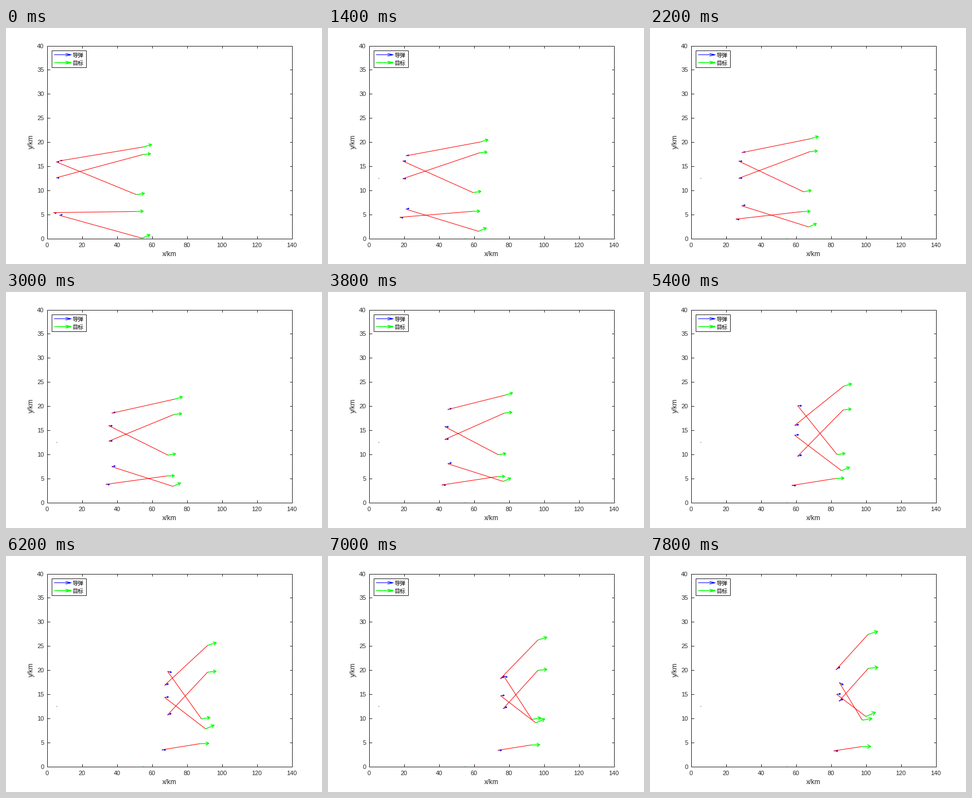
These frames come from a looping animation (560 by 420 pixels, 8 s). A matplotlib script:

```python
import numpy as np
import matplotlib.pyplot as plt
from matplotlib.animation import FuncAnimation
from matplotlib.patches import Rectangle

W, H, DPI = 560, 420, 100
PT = 72 / DPI                       # points per pixel
FRAMES, STEP = 40, 200
LEFT, RIGHT, TOP, BOTTOM = 73, 507, 31, 374
KX, KY = (RIGHT - LEFT) / 140, (BOTTOM - TOP) / 40   # pixels per km
SWITCH = 20                         # frame of the new target allocation
INK = "#262626"
BLUE, GREEN, RED = "#0000ff", "#00ff00", "#ff0000"

fig = plt.figure(figsize=(W / DPI, H / DPI), dpi=DPI, facecolor="white")
ax = fig.add_axes([0, 0, 1, 1])
# pixel centres, nudged so that snapped lines land on the right pixel
ax.set_xlim(-0.4, W - 0.4)
ax.set_ylim(H - 0.6, -0.6)
ax.axis("off")


def px(x):
    return LEFT + x * KX


def py(y):
    return BOTTOM - y * KY


def line(xs, ys, color=INK, width=1.0, **kw):
    kw.setdefault("solid_capstyle", "butt")
    return ax.plot(xs, ys, color=color, lw=width * PT, **kw)[0]


def box(x, y, w, h, face="none", edge=INK, **kw):
    return ax.add_patch(Rectangle((x, y), w, h, fc=face, ec=edge, lw=PT, **kw))


def label(x, y, s, size=11, font="Liberation Sans", **kw):
    kw = {"color": INK, "va": "baseline", **kw}
    ax.text(x, y, s, fontsize=size * PT, fontfamily=font, **kw)


def arrow_points(x, y, dx, dy, back=0.33, half=0.2):
    """Shaft followed by an open V head, sized as parts of the length."""
    tx, ty = x + dx, y + dy
    bx, by = tx - back * dx, ty - back * dy
    xs = [x, tx, np.nan, bx - half * dy, tx, bx + half * dy]
    ys = [y, ty, np.nan, by + half * dx, ty, by - half * dx]
    return xs, ys


def draw_axes(tick=4.3):
    box(LEFT, TOP, RIGHT - LEFT, BOTTOM - TOP)
    for v in range(0, 141, 20):
        for edge, d in ((BOTTOM, -tick), (TOP, tick)):
            line([px(v)] * 2, [edge, edge + d])
        label(px(v) - 1, 389, str(v), ha="center")
    for v in range(0, 41, 5):
        for edge, d in ((LEFT, tick), (RIGHT, -tick)):
            line([edge, edge + d], [py(v)] * 2)
        label(67, py(v) + 4, str(v), ha="right")
    label(289, 405, "x/km", 12, ha="center")
    label(44.5, 202, "y/km", 12, ha="center", va="center", rotation=90)


def draw_legend():
    box(81, 39, 61, 30, "white", zorder=5)
    for y, color, width, name in ((47, BLUE, 1, "导弹"), (61, GREEN, 1.5, "目标")):
        line(*arrow_points(85, y, 30, 0, half=0.08), color, width, zorder=6)
        label(117, y + 4.2, name, 10, "Noto Sans CJK JP", color="black", zorder=6)


class Group:
    """Bodies of one constant speed (km per frame) whose headings turn steadily."""

    def __init__(self, x, y, heading, turns, speed, scale, color, width):
        early, late = turns
        k = np.arange(FRAMES)[:, None]
        self.heading = (np.array(heading) + np.minimum(k, SWITCH) * early
                        + np.maximum(k - SWITCH, 0) * late)
        mid = (self.heading[1:] + self.heading[:-1]) / 2
        self.x = np.cumsum(np.vstack([x, speed * np.cos(mid)]), axis=0)
        self.y = np.cumsum(np.vstack([y, speed * np.sin(mid)]), axis=0)
        self.scale = scale
        self.arrows = [line([], [], color, width, zorder=3) for _ in x]

    def show(self, k, heading):
        xs, ys = self.x[k], self.y[k]
        # automatic arrow length follows the spread of the group
        size = self.scale * np.hypot(np.ptp(xs), np.ptp(ys))
        for art, x, y, a in zip(self.arrows, xs, ys, heading):
            art.set_data(*arrow_points(px(x), py(y), size * np.cos(a) * KX,
                                       -size * np.sin(a) * KY))


draw_axes()
draw_legend()

missiles = Group(
    x=[6.9, 5.05, 5.05, 6.9, 3.45],
    y=[16.1, 15.9, 12.6, 4.8, 5.37],
    heading=[0.07, 0.022, -0.029, 0.0956, -0.0834],
    turns=(np.array([1.5, -2.74, 4.38, -1.05, 3.97]) / 1000,
           np.array([-16.3, 15.7, -1.2, 7, -0.6]) / 1000),
    speed=2.0, scale=0.13, color=BLUE, width=1.15)

veer = np.array([3.7, 1.25, -2.46, -2.2, 3.2]) / 1000
targets = Group(
    x=[55, 54.4, 50.9, 50.2, 54.1],
    y=[19, 17.4, 9.1, 5.6, 0.06],
    heading=[0.109, 0.039, 0.059, 0.011, 0.16],
    turns=(veer, veer),
    speed=1.2, scale=0.2335, color=GREEN, width=1.5)

AIM_EARLY, AIM_LATE = (0, 2, 1, 4, 3), (2, 0, 4, 1, 3)
sights = [line([], [], RED, 1, zorder=4) for _ in AIM_EARLY]
dots = [box(89, 266, 0.2, 0.2, "#00007f", "#00007f"),
        box(241.5, 373, 1, 0.5, GREEN, GREEN, zorder=3)]


def update(k):
    missiles.show(k, missiles.heading[k])
    targets.show(k, targets.heading[0])
    aim = AIM_EARLY if k < SWITCH else AIM_LATE
    for i, j in enumerate(aim):
        sights[i].set_data([px(missiles.x[k, i]), px(targets.x[k, j])],
                           [py(missiles.y[k, i]), py(targets.y[k, j])])
    for d in dots:
        d.set_visible(k > 0)
    return missiles.arrows + targets.arrows + sights + dots


anim = FuncAnimation(fig, update, frames=FRAMES, interval=STEP,
                     repeat=True, repeat_delay=0, blit=False)
plt.show()
```
